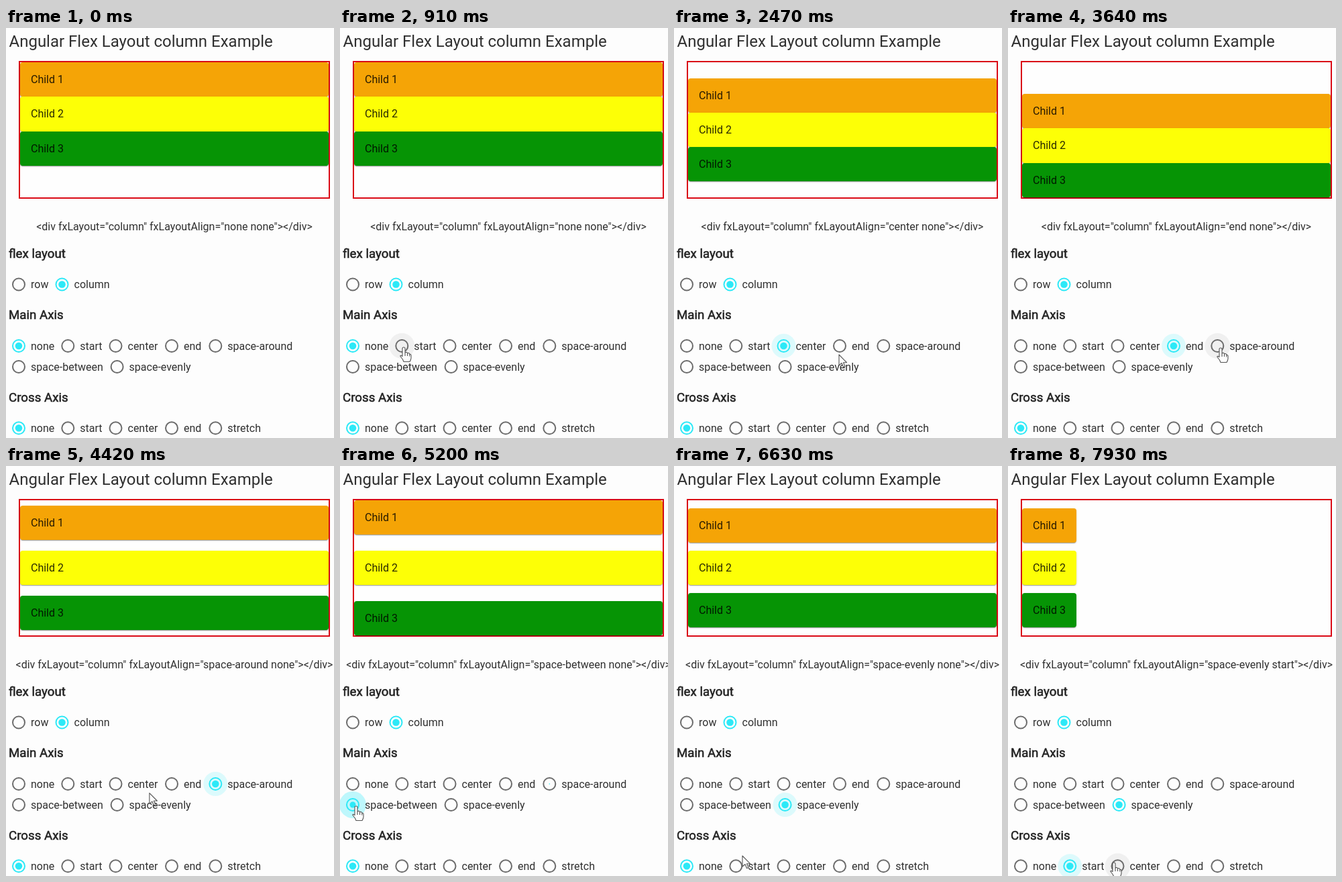
Write an HTML page that moves like this. It is 489 by 610 pixels and loops after 8 s.

```html
<!DOCTYPE html>
<html lang="en">
<head>
<meta charset="utf-8">
<title>Flex layout demo</title>
<style>
  html, body { margin: 0; width: 100%; height: 100%; overflow: hidden; background: #fdfdfd; }
  body, svg text { font: 16px Roboto, sans-serif; }
  svg { position: absolute; left: 0; top: 0; fill: #303030; }
  svg .title { font-size: 24px; }
  svg .head { font-size: 18.72px; fill: #222; stroke: #222; stroke-width: .55px; }
  #box {
    position: absolute; left: 19px; top: 49px; width: 464px; height: 205px;
    box-sizing: border-box; border: 2px solid #da0a16; background: #fefefe;
    display: flex; flex-direction: column;
  }
  #box div {
    padding: 16px; height: 19.3px; line-height: 19.3px; border-radius: 4px; color: rgba(0, 0, 0, .84);
    box-shadow: 0 2px 1px -1px rgba(0,0,0,.2), 0 1px 1px rgba(0,0,0,.14), 0 1px 3px rgba(0,0,0,.12);
  }
</style>
</head>
<body>
<div id="box">
  <div style="background:#f5a406">Child 1</div>
  <div style="background:#fdff06">Child 2</div>
  <div style="background:#069405">Child 3</div>
</div>
<svg id="stage" width="489" height="610" viewBox="0 0 489 610"></svg>
<script>
const stage = document.getElementById('stage');
const box = document.getElementById('box');
const CYAN = '#2ce9f7', GRAY = '#6c6c6c';
const LOOP = 8000, STEP = 130;

function add(tag, attrs, text = '') {
  const el = document.createElementNS('http://www.w3.org/2000/svg', tag);
  set(el, attrs);
  el.textContent = text;
  return stage.appendChild(el);
}
function set(el, attrs) {
  for (const k in attrs) el.setAttribute(k, attrs[k]);
}

add('text', { x: 4.5, y: 28, class: 'title' }, 'Angular Flex Layout column Example');
add('text', { x: 4, y: 342, class: 'head' }, 'flex layout');
add('text', { x: 4, y: 433, class: 'head' }, 'Main Axis');
add('text', { x: 4, y: 556, class: 'head' }, 'Cross Axis');
const code = add('text', { x: 251, y: 301, 'text-anchor': 'middle' });

function radio(group, name, x, y) {
  const halo = add('circle', { cx: x, cy: y });
  const ring = add('circle', { cx: x, cy: y, r: 9, fill: 'none', 'stroke-width': 2 });
  const dot = add('circle', { cx: x, cy: y, fill: CYAN });
  add('text', { x: x + 18, y: y + 5.7 }, name);
  return { group, name, x, y, halo, ring, dot };
}
const radios = [
  ['layout', 'row', 19, 381.5], ['layout', 'column', 83.5, 381.5],
  ['main', 'none', 19, 473], ['main', 'start', 92.3, 473], ['main', 'center', 163.5, 473],
  ['main', 'end', 247, 473], ['main', 'space-around', 312.3, 473],
  ['main', 'space-between', 19, 504], ['main', 'space-evenly', 165.6, 504],
  ['cross', 'none', 19, 595.3], ['cross', 'start', 92.3, 595.3], ['cross', 'center', 163.5, 595.3],
  ['cross', 'end', 247, 595.3], ['cross', 'stretch', 312.3, 595.3]
].map(r => radio(...r));

// time, group, chosen value
const clicks = [
  [-9999, 'layout', 'column'], [-9999, 'main', 'none'], [-9999, 'cross', 'none'],
  [1040, 'main', 'start'], [1820, 'main', 'center'], [3120, 'main', 'end'],
  [3900, 'main', 'space-around'], [5070, 'main', 'space-between'],
  [6110, 'main', 'space-evenly'], [7020, 'cross', 'start']
];

// time, x, y of the pointer tip
const path = [
  [0, 190, 640], [260, 180, 620], [910, 95, 475], [1300, 95, 475], [1690, 166, 477],
  [2080, 166, 477], [2470, 246, 486], [2600, 246, 486], [2860, 250, 476], [3250, 250, 476],
  [3640, 317, 476], [4160, 317, 476], [4810, 24, 506], [5330, 24, 506], [5720, 169, 507],
  [6370, 169, 507], [6630, 102, 580], [6890, 96, 597], [7280, 96, 597], [7670, 158, 590], [8000, 158, 590]
];
const ARROW = 'M0 0V16L4 12.5L6.5 18.5L9 17.5L6.5 11.7H11.5Z';
const HAND = 'M-2 2Q-2 0 0 0Q2 0 2 2V9Q2 7.3 3.8 7.3Q5.5 7.4 5.5 9.3Q6 8.2 7.4 8.5Q8.8 9 8.8 10.5' +
  'Q11 10 11 12V16Q11 18 9 21.5H0Q-1 18 -5 13.5Q-5.5 11 -2 13.5ZM2 9V13M5.5 9.3V13M8.8 10.5V13.5';
const pointer = add('path', { fill: '#fdfdfd', stroke: '#555', 'stroke-width': 1.1, 'stroke-linejoin': 'round' });

const clamp = v => Math.max(0, Math.min(1, v));
const easeOut = v => 1 - (1 - clamp(v)) ** 3;

function pointerAt(t) {
  const i = Math.max(1, path.findIndex(p => p[0] > t));
  const [a, b] = [path[i - 1], path[i]];
  const u = clamp((t - a[0]) / (b[0] - a[0]));
  const k = u * u * (3 - 2 * u);
  return [a[1] + (b[1] - a[1]) * k, a[2] + (b[2] - a[2]) * k];
}

function draw(t) {
  const past = clicks.filter(c => c[0] <= t);
  const last = past[past.length - 1];
  const now = {}, before = {};
  for (const c of past) {
    before[c[1]] = now[c[1]];
    now[c[1]] = c;
  }

  const [px, py] = pointerAt(t);
  let over = false;
  for (const r of radios) {
    const chosen = now[r.group], old = before[r.group];
    const on = chosen[2] === r.name;
    const age = t - chosen[0];
    const grow = easeOut(age / 280);
    const hover = Math.hypot(px - r.x, py - r.y) < 12;
    const focus = on && chosen === last && last[0] > 0;
    over = over || hover;
    set(r.ring, { stroke: on ? CYAN : GRAY });
    set(r.dot, { r: 5.3 * (on ? grow : old && old[2] === r.name ? 1 - grow : 0) });
    set(r.halo, {
      r: focus ? 20 * easeOut((age + 20) / 170) - 2 * clamp((age - 250) / 250) : 19,
      fill: focus ? CYAN : '#000',
      'fill-opacity': focus ? .3 - .15 * clamp((age - 130) / 400) : hover ? .05 : 0
    });
  }
  set(pointer, { d: over ? HAND : ARROW, transform: `translate(${px} ${py})` });

  const main = now.main[2], cross = now.cross[2];
  box.style.justifyContent = main === 'none' ? 'flex-start' : main;
  box.style.alignItems = cross === 'none' ? 'stretch' : cross;
  code.textContent = `<div fxLayout="column" fxLayoutAlign="${main} ${cross}"></div>`;
}

const t0 = performance.now();
function frame() {
  const t = (performance.now() - t0) % LOOP;
  draw(Math.floor(t / STEP) * STEP);
  requestAnimationFrame(frame);
}
frame();
</script>
</body>
</html>
```
